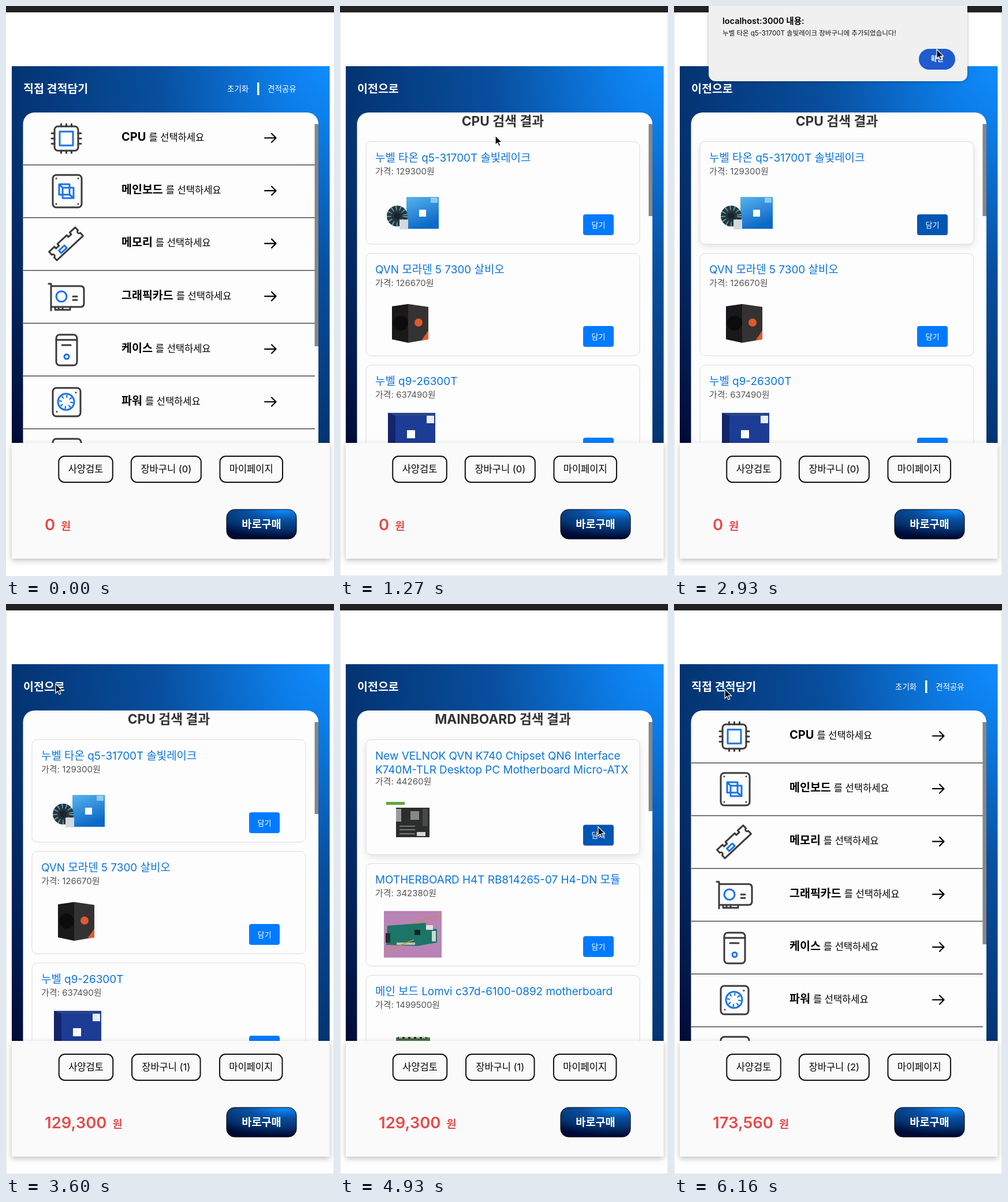
Recreate the animation shown at these times as an HTML page. Size 568 by 985 pixels, loop 6250 ms.

```html
<!DOCTYPE html>
<html lang="ko">
<head>
<meta charset="utf-8">
<style>
html, body { margin: 0; width: 100%; height: 100%; overflow: hidden; background: #fefefe; }
body, text { font-family: Inter, 'Noto Sans CJK KR', 'Noto Sans CJK', sans-serif; }
svg, #dialog { position: absolute; left: 0; top: 0; }
.bold { font-weight: 700; }
.mid { text-anchor: middle; }
.icon { fill: none; stroke: #3a3a3c; stroke-width: 3; stroke-linecap: round; stroke-linejoin: round; }
.icon .blue { stroke: #1a73e8; }
.card { fill: #fdfdfe; stroke: #dcdcdc; }
.buy { fill: #007bff; }
.hover .hot .card { filter: drop-shadow(0 4px 6px rgba(0,0,0,.1)); }
.hover .hot .buy { fill: #0056b3; }
.sheet { fill: #fafafa; filter: drop-shadow(0 3px 5px rgba(0,0,0,.25)); }
#dialog { left: 60px; top: -18px; width: 400px; padding: 35px 24px 20px; border-radius: 12px;
  background: #f0f0f0; box-shadow: 0 1px 5px rgba(0,0,0,.3); transform-origin: bottom; }
#dialog b { display: block; font: 600 14.5px/17px Inter, 'Noto Sans CJK KR', sans-serif; color: #000; }
#dialog p { margin: 4px 0 18px; font-size: 11.5px; line-height: 18px; color: #111; }
#dialog i { display: block; margin-left: 340px; width: 63px; border-radius: 18px; background: #1f5acf;
  color: #fff; font: 600 12px/36px Inter, 'Noto Sans CJK KR', sans-serif; text-align: center; }
</style>
</head>
<body>
<svg id="stage" width="568" height="985"></svg>
<div id="dialog"><b>localhost:3000 내용:</b><p id="message"></p><i>확인</i></div>
<svg id="pointer" width="568" height="985">
  <path id="cursor" d="M0 0v16l3.7-3.5 2.5 5.8 2.6-1.1-2.5-5.6h5.2z" stroke="#fff" stroke-width="1.2"/>
</svg>
<script>
const $ = id => document.getElementById(id);
const text = (x, y, size, fill, str, cls = '') =>
  `<text x="${x}" y="${y}" font-size="${size}" fill="${fill}" class="${cls}">${str}</text>`;
const rect = (x, y, w, h, fill, r = 0, more = '') =>
  `<rect x="${x}" y="${y}" width="${w}" height="${h}" rx="${r}" fill="${fill}" ${more}/>`;
const path = (d, more = '') => `<path d="${d}" ${more}/>`;
const dot = (x, y, r, more = '') => `<circle cx="${x}" cy="${y}" r="${r}" ${more}/>`;
const outline = (x, y, w, h, more = '') => rect(x, y, w, h, 'none', 6, more);
const BLUE = 'class="blue"';

// Part list
const PITCH = 91.2;
const parts = ['CPU', '메인보드', '메모리', '그래픽카드', '케이스', '파워'];
const icons = [
  outline(84, 208, 41, 42) + rect(93, 217, 23, 24, 'none', 0, BLUE) +
    [-9, 0, 9].map(d => path(`M${104.5 + d} 204v4m0 42v4M79 ${229 + d}h5m41 0h5`)).join(''),
  outline(81, 292, 50, 56) + path('M87 298h0M125 298h0M87 342h0M125 342h0') +
    path('M92 308h18v18h-18zM98 314h19v18h-19zM92 308l6 6M110 326l7 6', BLUE),
  `<g transform="translate(104 411) rotate(-43)">` +
    path('M-31-10h13v4h7v-4h22v4h7v-4h13v7a3 3 0 0 0 0 6v7h-62v-7a3 3 0 0 0 0-6z') +
    rect(-17, 0, 13, 6, 'none', 0, BLUE) + '</g>',
  path('M74 480h4v46M78 484h51q6 0 6 6v24q0 6-6 6h-51M85 520v5h6v-4m0 4h7v-4m0 4h13v-5M116 502h7m-7 6h7') +
    dot(96, 502, 9, BLUE),
  outline(87, 568, 36, 53) + path('M87 577h36M97 586h15') + dot(105, 606, 4, BLUE),
  outline(81, 660, 48, 49) + path('M121 668h0M88 701h0') + dot(104, 684, 14, BLUE) +
    dot(104, 684, 9.5, BLUE + ' style="stroke-width:5;stroke-linecap:butt;stroke-dasharray:2.2 5.26"'),
  outline(81, 748, 49, 50),
];
const listPage =
  text(30, 150, 19.5, '#fff', '직접 견적담기', 'bold') + text(383, 148, 13.5, '#fff', '초기화') +
  rect(435, 132, 3.5, 22, '#fff') + text(453, 148, 13.5, '#fff', '견적공유') +
  parts.map((name, i) => {
    const y = i * PITCH;
    return text(200, 233 + y, i ? 19.5 : 20, '#000',
        `${name}<tspan dx="5" font-size="16.5" font-weight="400">를 선택하세요</tspan>`, 'bold') +
      path(`M448 ${228 + y}h19m-7-7.5l7.5 7.5-7.5 7.5`,
        'fill="none" stroke="#000" stroke-width="2.2" stroke-linecap="round" stroke-linejoin="round"') +
      rect(30, 274 + y, 505, 1.2, '#222');
  }).join('') +
  `<g class="icon">${icons.join('')}</g>` + rect(534.5, 204, 6.5, 384, '#868686');

// Search results
const card = (y, lines, price, picture, hot) => {
  const extra = (lines.length - 1) * 21.5;
  return `<g class="${hot ? 'hot' : ''}">` +
    rect(45, y, 474, 177 + extra, '#fff', 9, 'class="card"') +
    lines.map((s, i) => text(61, y + 34.5 + i * 23.5, 18.9, '#0a74e0', s)).join('') +
    text(61, y + 56 + extra, 15, '#555', `가격: ${price}원`) +
    rect(421, y + 125.5 + extra, 53, 36, '', 4, 'class="buy"') +
    text(447.5, y + 148 + extra, 13, '#fff', '담기', 'mid') + picture + '</g>';
};
const results = (name, barHeight, cards) =>
  text(30, 150, 19.5, '#fff', '이전으로', 'bold') +
  text(282, 206.5, 22.7, '#333', name + ' 검색 결과', 'bold mid') +
  cards.join('') + rect(534.5, 204, 6.5, barHeight, '#868686');

const coolerPhoto = rect(115, 330, 56, 55, 'url(#sky)') + rect(137, 352, 12, 12, '#fff') +
  rect(157, 331, 12, 9, '#8ccbf2') + dot(99, 363, 18, 'fill="#27343c"') +
  dot(99, 363, 14, 'fill="none" stroke="#5d99ab" stroke-width="8" stroke-dasharray="2 5"') +
  dot(99, 363, 6, 'fill="#18242c"') + rect(103, 369, 15, 17, '#d5d9db', 1);
const blackBoxPhoto = path('M90 519l28-4v67l-28-6z', 'fill="#19191b"') +
  path('M118 515l35 5v56l-35 6z', 'fill="#343233"') + dot(105, 548, 13, 'fill="#0c0c0d"') +
  dot(136, 547, 7, 'fill="#df5a2d"') + path('M153 561v15l-12 2z', 'fill="#e8592a"');
const blueBoxPhoto = rect(83, 703, 82, 60, '#1c3c96') + path('M83 703l13 5v55H83z', 'fill="#14256b"') +
  path('M83 703h82l-4 5H96z', 'fill="#2a4686"') +
  rect(150, 708, 13, 13, '#e8edf5') + rect(116, 733, 14, 14, '#fff');
const boardPhoto = rect(80, 342, 32, 5, '#62a636') + rect(97, 352, 58, 51, '#2c2e2e') +
  rect(122, 358, 15, 15, '#85888a') + rect(97, 354, 9, 22, '#9a9c9c') + rect(143, 354, 9, 30, '#48494a') +
  [383, 389, 396].map(y => rect(103, y, 27, 2, '#737779')).join('') + rect(133, 394, 15, 7, '#d5d5d5');
const modulePhoto = rect(76, 530.5, 100, 80.5, '#b983b5') +
  path('M82 556L148 551L151 560L168 562V585L134 591L80 589z', 'fill="#1c7567"') +
  rect(79, 569, 8, 16, '#252c2d') + rect(159, 565, 7, 18, '#cfd5d0') + rect(129, 563, 10, 9, '#172322') +
  rect(98, 585, 32, 4, '#b7c5b6') + rect(149, 555, 12, 8, '#e4e2dc') +
  path('M77 601L128 580M120 552L176 538', 'stroke="#d9843f" stroke-width="1.5"');
const stripPhoto = rect(97, 749, 59, 30, '#447a4c') + rect(100, 748, 50, 4, '#2c3b31') +
  [102, 112, 122, 132, 142].map(x => rect(x, 748, 6, 3, '#b7b48c')).join('');

const cpuTitle = '누벨 타온 q5-31700T 솔빛레이크';
const boardTitle = ['New VELNOK QVN K740 Chipset QN6 Interface', 'K740M-TLR Desktop PC Motherboard Micro-ATX'];
const cpuPage = results('CPU', 159, [
  card(234.5, [cpuTitle], 129300, coolerPhoto, true),
  card(427.5, ['QVN 모라덴 5 7300 살비오'], 126670, blackBoxPhoto),
  card(620.5, ['누벨 q9-26300T'], 637490, blueBoxPhoto)]);
const boardPage = results('MAINBOARD', 154, [
  card(234.5, boardTitle, 44260, boardPhoto, true),
  card(448.5, ['MOTHERBOARD H4T RB814265-07 H4-DN 모듈'], 342380, modulePhoto),
  card(641.5, ['메인 보드 Lomvi c37d-6100-0892 motherboard'], 1499500, stripPhoto)]);

// Bottom sheet
const totals = ['0', '129,300', '173,560'];
const sheet = count => {
  const nudge = count === 1 ? 0.5 : 0;
  const button = (mid, w, label) =>
    rect(mid - w / 2, 778, w, 45, '#fafafa', 10, 'stroke="#111" stroke-width="2"') +
    text(mid, 806, 16.5, '#000', label, 'mid');
  return button(138 + nudge, 93.5, '사양검토') + button(277.3, 121 - 5 * nudge, `장바구니 (${count})`) +
    button(424.7 - nudge, 108.5, '마이페이지') +
    `<text x="67" y="906" font-size="27.5" font-weight="600" fill="#e94b4b">${totals[count]}` +
    '<tspan dx="10" dy="-1" font-size="18.5">원</tspan></text>';
};

$('stage').innerHTML = `<defs>
  <radialGradient id="deep" cx="1" cy="0" r="1.414"><stop stop-color="#108cff"/><stop offset=".12" stop-color="#0c7ce6"/>
    <stop offset=".38" stop-color="#084f9f"/><stop offset=".7" stop-color="#043473"/><stop offset="1" stop-color="#000a35"/></radialGradient>
  <radialGradient id="glow" cx="0" cy="0" r="1" gradientTransform="translate(.8) scale(1.35 .95)" href="#deep"/>
  <linearGradient id="sky" x2=".4" y2="1"><stop stop-color="#58b4ec"/><stop offset="1" stop-color="#0d68c8"/></linearGradient></defs>` +
  rect(0, 0, 568, 11, '#222') +
  rect(0.5, 11.5, 567, 973, 'none', 0, 'id="frame" stroke="#e6e6e6"') +
  rect(10, 104, 550.5, 652, 'url(#deep)') +
  path('M29.5 756V204a20 20 0 0 1 20-20H521a20 20 0 0 1 20 20V756z', 'fill="#fdfdfe"') +
  `<g id="list">${listPage}</g><g id="cpu">${cpuPage}</g><g id="board">${boardPage}</g>` +
  rect(10, 755, 550.5, 200, '', 0, 'class="sheet"') + '<g id="sheet"></g>' +
  rect(382, 870, 121, 51, 'url(#glow)', 14, 'stroke="#000"') +
  text(442.5, 902, 18.6, '#fff', '바로구매', 'bold mid');

// Timeline
const LOOP = 6250, STEP = 200 / 3;
const route = [
  [70, 430, 890], [600, 269, 224], [1270, 269, 224], [1800, 447, 380], [2460, 447, 380],
  [2860, 455, 75], [3270, 455, 75], [3600, 86, 138], [4400, 86, 138], [4590, 290, 318],
  [4680, 290, 318], [4870, 447, 385], [5200, 447, 385], [5430, 457, 114], [5670, 457, 114],
  [5930, 88, 147], [LOOP, 88, 147]];
const clamp = v => Math.min(1, Math.max(0, v));
const ramp = (t, from, length) => clamp((t - from) / length);
const between = (t, a, b) => t >= a && t < b;

function pointerAt(t) {
  const i = Math.max(1, route.findIndex(k => k[0] > t));
  const [t0, x0, y0] = route[i - 1], [t1, x1, y1] = route[i];
  const p = ramp(t, t0, t1 - t0), e = p * p * (3 - 2 * p);
  return [x0 + (x1 - x0) * e, y0 + (y1 - y0) * e];
}

let shownCount;
function render(now) {
  const t = Math.floor((now % LOOP + 4) / STEP) * STEP;
  const page = between(t, 720, 3920) ? 'cpu' : between(t, 4660, 5990) ? 'board' : 'list';
  for (const id of ['list', 'cpu', 'board']) $(id).style.display = id === page ? '' : 'none';
  $('frame').style.display = t > 720 ? '' : 'none';
  $('stage').classList.toggle('hover', between(t, 1650, 3300) || between(t, 4660, 5700));

  const count = t < 3000 ? 0 : t < 5530 ? 1 : 2;
  if (count !== shownCount) $('sheet').innerHTML = sheet(shownCount = count);

  const second = t > 4000;
  const [open, close] = second ? [4950, 5450] : [2230, 2950];
  const p = ramp(t, open, 170) - ramp(t, close, 120);
  const message = `${second ? boardTitle.join(' ') : cpuTitle} 장바구니에 추가되었습니다!`;
  if ($('message').textContent !== message) $('message').textContent = message;
  $('dialog').style.opacity = p;
  $('dialog').style.transform = p < 1
    ? `translateY(${-55 * (1 - p)}px) perspective(1000px) rotateX(${30 * (1 - p)}deg)` : 'none';

  const [x, y] = pointerAt(t);
  $('cursor').setAttribute('transform', `translate(${x} ${y})`);
  $('cursor').style.display = t > 60 ? '' : 'none';
}

function tick() {
  render(performance.now());
  requestAnimationFrame(tick);
}
tick();
</script>
</body>
</html>
```
